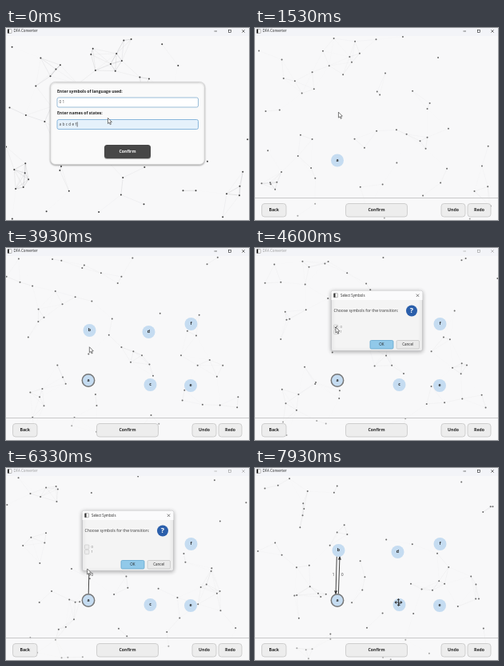
An HTML page with a canvas that plays this animation: 304 by 240 pixels, repeating every 8 s.

```html
<!DOCTYPE html>
<html lang="en">
<head>
<meta charset="utf-8">
<title>DFA Converter</title>
<style>
  html, body { margin: 0; width: 100%; height: 100%; overflow: hidden; background: #f8f8f9; }
  canvas { display: block; width: 304px; height: 240px; }
</style>
</head>
<body>
<canvas id="stage"></canvas>
<script>
const WIDTH = 304, HEIGHT = 240, LOOP = 8000, STEP = LOOP / 120;
const canvas = document.getElementById('stage');
const ctx = canvas.getContext('2d');
const density = Math.max(1, window.devicePixelRatio || 1);
canvas.width = WIDTH * density;
canvas.height = HEIGHT * density;

const SCENE_START = 670;
const states = [
  { name: 'a', x: 103, y: 165.5, at: 1200 },
  { name: 'b', x: 104.5, y: 103, at: 1600 },
  { name: 'c', x: 180.5, y: 171, at: 1930 },
  { name: 'd', x: 178.5, y: 105, at: 2270 },
  { name: 'e', x: 231, y: 172, at: 2800 },
  { name: 'f', x: 231.5, y: 95, at: 3130 }
];
const selections = [
  ['a', 3530, 5200], ['b', 4060, 5200],
  ['b', 5580, 6930], ['a', 5870, 6930], ['a', 7400, LOOP]
];
const prompts = [
  { open: 4130, close: 5200, checkAt: 4600, choice: 0 },
  { open: 5930, close: 6930, checkAt: 6530, choice: 1 }
];

// Pointer stops: time, x, y
const pointerPath = [
  [0, 127.5, 112.5], [450, 152, 154], [700, 152, 154],
  [1130, 103, 165], [1230, 103, 165], [1500, 104.5, 102.5], [1620, 104.5, 103],
  [1900, 180, 171], [1960, 180, 171], [2230, 178, 105], [2330, 178, 105],
  [2800, 231, 172], [2860, 231, 172], [3100, 231, 95], [3180, 231, 95],
  [3480, 103, 165], [3600, 103, 165], [4030, 105, 104], [4160, 105, 104],
  [4530, 101, 99], [4640, 101, 99], [4950, 157, 120], [5180, 157, 120],
  [5500, 104, 103], [5600, 104, 103], [5830, 103, 165], [5960, 103, 165],
  [6470, 101, 105], [6560, 101, 105], [6800, 157, 120], [6960, 157, 120],
  [7330, 103, 165], [7470, 103, 165], [7870, 179.5, 168], [LOOP, 179.5, 168]
];

let seed = 73;
function random() {
  seed = (seed * 16807) % 2147483647;
  return seed / 2147483647;
}
const particles = Array.from({ length: 64 }, () => ({
  x: random() * WIDTH, y: random() * 230,
  vx: (random() - 0.5) * 25, vy: (random() - 0.5) * 25
}));

const mod = (value, size) => ((value % size) + size) % size;

function text(label, x, y, size, { weight = 400, color = '#222', align = 'left' } = {}) {
  ctx.font = `${weight} ${size}px "Open Sans", sans-serif`;
  ctx.textAlign = align;
  ctx.textBaseline = 'middle';
  ctx.fillStyle = color;
  ctx.fillText(label, x, y);
}

function box(x, y, w, h, radius, fill, stroke, lineWidth = 0.8) {
  ctx.beginPath();
  ctx.roundRect(x, y, w, h, radius);
  ctx.fillStyle = fill;
  ctx.fill();
  if (stroke) {
    ctx.strokeStyle = stroke;
    ctx.lineWidth = lineWidth;
    ctx.stroke();
  }
}

function line(points, color, width) {
  ctx.beginPath();
  points.forEach(([x, y]) => ctx.lineTo(x, y));
  ctx.strokeStyle = color;
  ctx.lineWidth = width;
  ctx.stroke();
}

function polygon(points, fill) {
  ctx.beginPath();
  points.forEach(([x, y]) => ctx.lineTo(x, y));
  ctx.closePath();
  ctx.fillStyle = fill;
  ctx.fill();
}

function disc(x, y, radius, fill) {
  ctx.beginPath();
  ctx.arc(x, y, radius, 0, Math.PI * 2);
  ctx.fillStyle = fill;
  ctx.fill();
}

function shadowed(draw, blur) {
  ctx.save();
  ctx.shadowColor = 'rgba(0,0,0,.3)';
  ctx.shadowBlur = blur * density;
  ctx.shadowOffsetY = density;
  draw();
  ctx.restore();
}

function button(label, x, y, w, h) {
  box(x, y, w, h, 3.5, '#ededed', '#c6c6c6');
  text(label, x + w / 2, y + h / 2 + 0.2, 5.2, { weight: 700, align: 'center' });
}

function cross(x, y, r, color) {
  line([[x - r, y - r], [x + r, y + r]], color, 0.6);
  line([[x + r, y - r], [x - r, y + r]], color, 0.6);
}

function drawParticles(time, intro) {
  const reach = 40;
  const dots = particles.map(p => ({
    x: mod(p.x + p.vx * time / 1000, WIDTH),
    y: 10 + mod(p.y + p.vy * time / 1000, 230)
  }));
  dots.forEach((p, i) => {
    for (const q of dots.slice(i + 1)) {
      const distance = Math.hypot(p.x - q.x, p.y - q.y);
      if (distance < reach) {
        const alpha = (1 - distance / reach) * (intro ? 0.45 : 0.16);
        line([[p.x, p.y], [q.x, q.y]], `rgba(110,110,115,${alpha})`, 0.6);
      }
    }
  });
  for (const p of dots) disc(p.x, p.y, 1, intro ? '#3c3c3c' : '#6a6a6a');
}

function drawTitleBar(dimmed) {
  const color = dimmed ? '#999' : '#222';
  ctx.fillStyle = '#f3f4f8';
  ctx.fillRect(0, 0, WIDTH, 10);
  drawWindowIcon(2, 1.5);
  text('DFA Converter', 9.5, 4.2, 4.45, { color });
  line([[260.5, 4], [264, 4]], color, 0.6);
  ctx.strokeRect(278.3, 2.3, 3.2, 3.2);
  cross(297, 4, 1.7, color);
}

function drawWindowIcon(x, y) {
  box(x, y, 5, 5, 0.5, '#fff', '#777', 0.5);
  ctx.fillStyle = '#333';
  ctx.fillRect(x, y, 2, 5);
}

function drawSetup(time) {
  shadowed(() => box(55.5, 67.5, 193, 103, 6, '#fafafa', '#d4d4d4'), 2);
  text('Enter symbols of language used:', 64, 79.5, 5.1, { weight: 700 });
  text('Enter names of states:', 64, 107, 5.1, { weight: 700 });
  box(64, 87, 176.5, 12, 2, '#fff', '#82acd0');
  box(64, 114.5, 176.5, 12, 2, '#e5f1fb', '#70a7d5');
  text('0 1', 66.5, 93.2, 4.7, { color: '#444' });
  text('a b c d e f', 66.5, 120.7, 4.85, { color: '#444' });
  if (time < 500) line([[89.2, 117.5], [89.2, 123.5]], '#222', 0.6);
  const pressed = time > 470;
  shadowed(() => box(123, 146, 58, 17, 3.5, pressed ? '#333' : '#474747'), 1);
  text('Confirm', 152, 154.7, 5.2, { weight: 700, color: '#fff', align: 'center' });
}

function arrow(x1, y1, x2, y2, label, labelX) {
  const angle = Math.atan2(y2 - y1, x2 - x1);
  line([[x1, y1], [x2, y2]], '#444', 1);
  const wing = turn => [x2 - 5 * Math.cos(angle + turn), y2 - 5 * Math.sin(angle + turn)];
  polygon([[x2, y2], wing(0.42), wing(-0.42)], '#333');
  text(label, labelX, 134, 4.5, { color: '#333', align: 'center' });
}

function drawEdges(time) {
  if (time >= prompts[1].close) {
    arrow(104.4, 157.5, 106, 110, '0', 109.3);
    arrow(102.3, 110.5, 101, 158, '1', 98);
  } else if (time >= prompts[0].close) {
    arrow(103.2, 157.5, 104.4, 110.5, '0', 107.8);
  }
}

function drawStates(time) {
  for (const { name, x, y, at } of states) {
    if (time < at) continue;
    disc(x, y, 8, '#c5dcf1');
    const selected = selections.some(([id, from, to]) => id === name && time >= from && time < to);
    if (selected) {
      ctx.beginPath();
      ctx.arc(x, y, 7.7, 0, Math.PI * 2);
      ctx.strokeStyle = '#777';
      ctx.lineWidth = 1.5;
      ctx.stroke();
    }
    text(name, x, y, 5.2, { weight: 700, align: 'center' });
  }
}

function drawToolbar() {
  ctx.fillStyle = '#f7f7f8';
  ctx.globalAlpha = 0.4;
  ctx.fillRect(0, 212, WIDTH, 28);
  ctx.globalAlpha = 1;
  line([[0, 212.5], [WIDTH, 212.5]], '#c4c4c6', 0.9);
  button('Back', 8.5, 219.5, 30.5, 16.5);
  button('Confirm', 113.5, 219.5, 77, 16.5);
  button('Undo', 233, 219.5, 30, 16.5);
  button('Redo', 266, 219.5, 29, 16.5);
}

function drawPrompt({ checkAt, choice }, time) {
  shadowed(() => box(95.5, 53.5, 114, 75, 2, '#f4f4f4', '#c2c2c4'), 5);
  box(95.5, 53.5, 114, 11.5, [2, 2, 0, 0], '#fbfbfc');
  drawWindowIcon(98.5, 56.7);
  text('Select Symbols', 107, 59.4, 4.4);
  cross(203.5, 59.3, 1.7, '#333');
  text('Choose symbols for the transition:', 98.5, 78.8, 5.05, { color: '#333' });
  disc(196, 78.5, 7, '#2b5fab');
  text('?', 196, 78.7, 9, { weight: 700, color: '#fff', align: 'center' });
  ['0', '1'].forEach((symbol, i) => {
    const y = 96 + i * 6.3;
    box(98.5, y, 5.4, 5.4, 1, '#ececec', '#c5c5c5', 0.6);
    text(symbol, 106.5, y + 2.8, 4.3, { color: '#777' });
    if (i === choice && time >= checkAt) {
      line([[99.7, y + 2.7], [100.9, y + 4], [102.8, y + 1.3]], '#333', 0.8);
    }
  });
  box(144, 115.5, 29, 10.5, 1.5, '#91c9e9', '#64a6cd');
  text('OK', 158.5, 121, 4.5, { align: 'center' });
  box(177, 115.5, 28.5, 10.5, 1.5, '#e9e9e9', '#c6c6c6');
  text('Cancel', 191.2, 121, 4.5, { align: 'center' });
}

function pointerAt(time) {
  const next = Math.max(1, pointerPath.findIndex(stop => stop[0] > time));
  const [t1, x1, y1] = pointerPath[next - 1], [t2, x2, y2] = pointerPath[next];
  const p = (time - t1) / (t2 - t1);
  const eased = p * p * (3 - 2 * p);
  return { x: x1 + (x2 - x1) * eased, y: y1 + (y2 - y1) * eased };
}

function drawPointer(time, canMove) {
  const { x, y } = pointerAt(time);
  const overState = canMove && states.some(s => time >= s.at + 70 && Math.hypot(s.x - x, s.y - y) < 7);
  ctx.save();
  ctx.translate(x, y);
  if (overState) {
    for (let i = 0; i < 4; i++) {
      line([[0, 0], [0, -3]], '#333', 0.9);
      polygon([[0, -5], [1.9, -2.7], [-1.9, -2.7]], '#333');
      ctx.rotate(Math.PI / 2);
    }
  } else {
    const outline = [[0, 0], [0, 7], [1.6, 5.6], [2.8, 8.2], [3.9, 7.7], [2.8, 5.2], [4.9, 5], [0, 0]];
    polygon(outline, '#fff');
    line(outline, '#444', 0.7);
  }
  ctx.restore();
}

function draw(time) {
  const intro = time < SCENE_START;
  const prompt = prompts.find(p => time >= p.open && time < p.close);
  ctx.setTransform(density, 0, 0, density, 0, 0);
  ctx.fillStyle = '#f8f8f9';
  ctx.fillRect(0, 0, WIDTH, HEIGHT);
  drawParticles(time, intro);
  drawTitleBar(Boolean(prompt));
  if (intro) {
    drawSetup(time);
  } else {
    drawEdges(time);
    drawStates(time);
    drawToolbar();
    if (prompt) drawPrompt(prompt, time);
  }
  drawPointer(time, !intro && !prompt);
}

const start = performance.now();
function tick() {
  const elapsed = (performance.now() - start) % LOOP;
  draw(Math.floor(elapsed / STEP) * STEP);
  requestAnimationFrame(tick);
}
tick();
</script>
</body>
</html>
```
